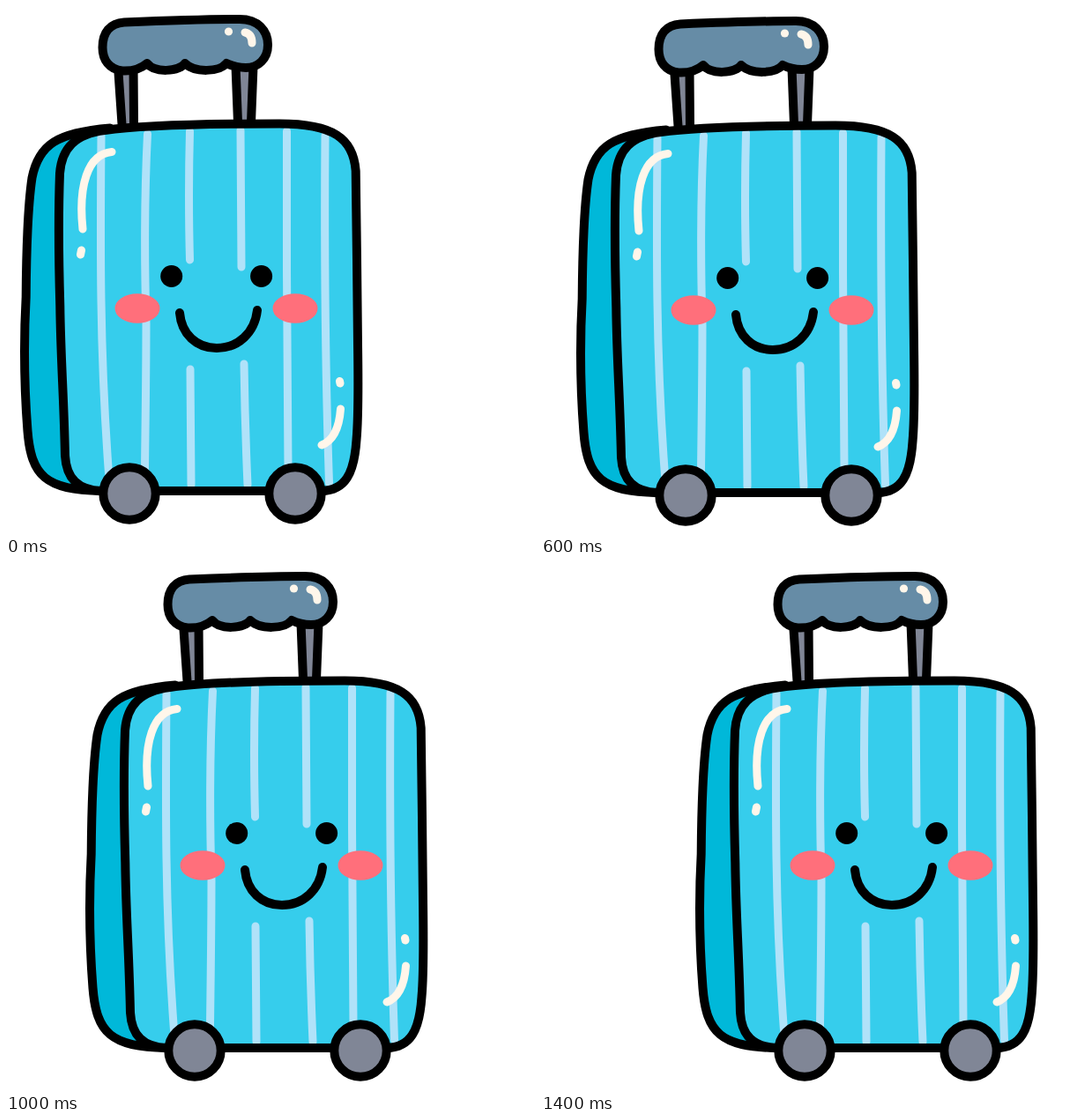
Recreate the animation shown at these times as an HTML page. Size 600x600 px, loop 1500 ms.

```html
<!DOCTYPE html>
<html lang="en">
<head>
<meta charset="utf-8">
<title>Rolling suitcase</title>
<style>
  html, body { margin: 0; width: 100%; height: 100%; overflow: hidden; background: #fff; }
  svg { display: block; width: 100vw; height: 100vh; }
  .ink { stroke: #000; stroke-width: 10; }
  .stripe { stroke: #b0e2f9; stroke-width: 9; }
  .shine { stroke: #fff6ea; stroke-width: 9; }
  .none { fill: none; }
</style>
</head>
<body>
<svg viewBox="0 0 600 600" stroke-linecap="round" stroke-linejoin="round">
  <defs>
    <path id="shell" d="M112 141 C150 135.500 220 133.500 310 133.500 C371 133.500 394 150 396.700 187 C397.500 230 398.500 340 399 385 C399.500 420 399.500 470 397.500 492 C395 530 385 549.500 358 550 H108 C82 549 68.500 536 67 510 C65.500 440 62 400 61.300 340 C59.500 280 59.500 230 61 190 C63 162 78 145 112 141Z"/>
  </defs>
  <g id="bag">
    <!-- rods -->
    <path fill="#808696" d="M127 68 L131.500 134 H145 L144.500 68Z M260.500 68 L263 132 H278 L280.500 68Z"/>
    <path class="ink none" d="M127 68 L131.500 134 M144.500 68 L145 134 M260.500 68 L263 132 M280.500 68 L278 132"/>

    <!-- grip -->
    <path class="ink" fill="#668ca6" d="M134 18.500 C170 17 225 15 265 15 C286 15 297 28 297 44 C297 60 286 70 272 70 C264 70 256 68 250 65 C242 75 214 76 203 65 C196 75 168 76 160 65 C152 72 142 74 132 73.500 C117 72 109.500 61 109.500 47 C109.500 30 118 19.500 134 18.500Z"/>
    <circle cx="252.500" cy="29" r="4.600" fill="#fff6ea"/>
    <path class="shine none" d="M271 30 C276 31 279 35 279 42"/>

    <!-- back shell -->
    <path class="ink" fill="#00b8d9" d="M118 138.500 C58 143.500 37 157 29.500 195 C24 232 23 290 22.700 330 C20.500 370 20.500 430 24.500 482 C28.500 533 45 549 108 550Z"/>

    <!-- front shell -->
    <use href="#shell" fill="#36cdec"/>
    <g class="stripe none">
      <path d="M108 148 C107 270 106 390 116.500 530"/>
      <path d="M160.500 145 C157 215 157 290 159 360 C159 420 158 480 157.500 525"/>
      <path d="M208.500 142 Q206.500 215 208.500 288 M209 412 L210 543"/>
      <path d="M266 141 L267 296 M270 406 Q271 475 274 543"/>
      <path d="M318.500 142 L318.500 300 L320 525"/>
      <path d="M362 147 C361 280 362 410 366.500 541"/>
    </g>
    <use href="#shell" class="ink none"/>
    <path class="shine none" d="M120 165.500 C92 168 82 205 87 253 M85.500 277 L84.500 282 M379.500 457 C378 478 371 493 358 498 M378.500 425.500 L379 428"/>

    <!-- face -->
    <g fill="#ff6f7b">
      <ellipse cx="149" cy="343" rx="25.500" ry="16.700"/>
      <ellipse cx="328" cy="343" rx="25.500" ry="16.700"/>
    </g>
    <circle cx="187.700" cy="306.500" r="12.500"/>
    <circle cx="289.600" cy="306.500" r="12.500"/>
    <path class="ink none" d="M197 348 C199 372 216 388 239 388 C263 388 282 371 285 345"/>

    <!-- wheels -->
    <g class="ink" fill="#808696">
      <circle cx="140" cy="553" r="29.700"/>
      <circle cx="328" cy="553" r="29.700"/>
    </g>
  </g>
</svg>
<script>
  const LOOP = 1500, STEP = 100;
  const bag = document.getElementById('bag');

  // Keys are [step, value]
  const driftX = [[0, 0], [6, 24], [8, 44], [10, 74], [13, 118], [14, 159]];
  const bumpY = [[0, 0], [2, -2], [4, 2], [6, 2], [8, 4], [10, 0], [13, 2], [14, 0]];

  function sample(keys, s) {
    const i = Math.max(1, keys.findIndex(k => k[0] >= s));
    const [a, from] = keys[i - 1], [b, to] = keys[i];
    return from + (to - from) * (s - a) / (b - a);
  }

  function draw(ms) {
    const s = Math.floor((ms % LOOP) / STEP);
    bag.setAttribute('transform', `translate(${sample(driftX, s)} ${sample(bumpY, s)})`);
  }

  const start = performance.now();
  function tick(now) {
    draw(Math.max(0, now - start));
    requestAnimationFrame(tick);
  }
  draw(0);
  requestAnimationFrame(tick);
</script>
</body>
</html>
```
